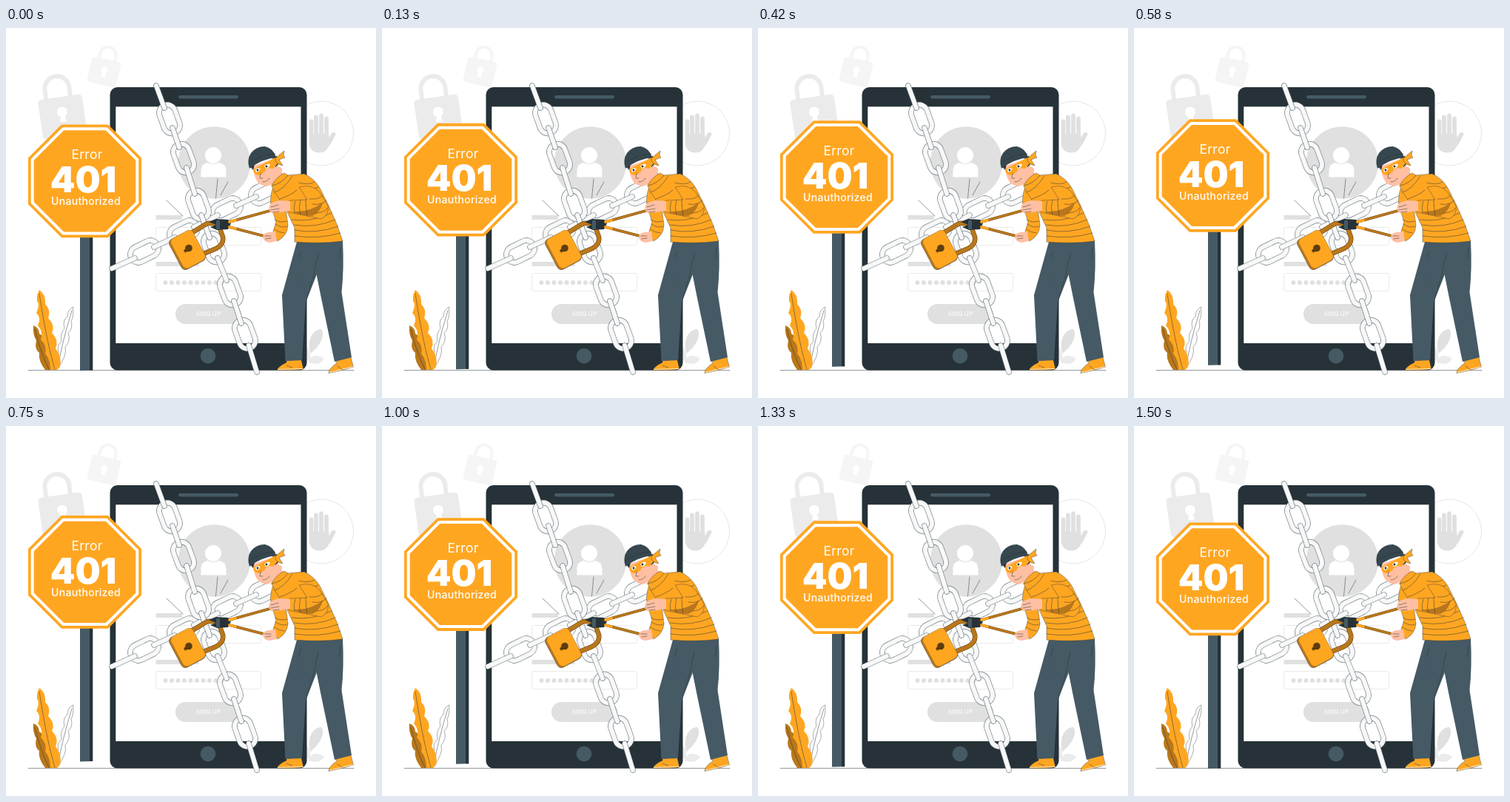
Write an HTML page that moves like this. It is 500 by 500 pixels and loops after 1.54 s.

```html
<!DOCTYPE html>
<html lang="en">
<head>
<meta charset="utf-8">
<title>Error 401</title>
<style>
  html, body { margin: 0; height: 100%; overflow: hidden; background: #fff; }
  svg { display: block; width: 100%; height: 100%; }
  text { font-family: Inter, "Open Sans", sans-serif; fill: #fff; text-anchor: middle; }
  .orange { fill: #ffa621; }
  .brown { fill: #b9771b; }
  .slate { fill: #455a64; }
  .dark { fill: #263238; }
  .skin { fill: #ffbfa3; }
  .grey { fill: #e0e0e0; }
  .line { fill: none; stroke: #263238; stroke-width: .5; stroke-linecap: round; }
  .ink { stroke: #263238; stroke-width: .4; stroke-linejoin: round; }
  .round { fill: none; stroke-linecap: round; stroke-linejoin: round; }
</style>
</head>
<body>
<svg viewBox="0 0 500 500">
  <!-- background padlocks -->
  <g transform="rotate(-8 76 118)" fill="#ebebeb">
    <path d="M57.500 95V81a16.500 16.500 0 0 1 33 0V95" fill="none" stroke="#ebebeb" stroke-width="6"/>
    <rect x="46" y="93" width="60" height="54" rx="5"/>
    <path d="M72 127l1.500-7a7 7 0 1 1 6 0l1.500 7z" fill="#fff"/>
  </g>
  <g transform="rotate(13 132.500 59.500)" fill="#f5f5f5">
    <path d="M121.500 48V36a11 11 0 0 1 22 0V48" fill="none" stroke="#f5f5f5" stroke-width="4"/>
    <rect x="112.500" y="42" width="40" height="35" rx="4"/>
    <path d="M129.500 66l1-5a4.500 4.500 0 1 1 4 0l1 5z" fill="#fff"/>
  </g>

  <!-- stop hand -->
  <circle cx="426" cy="142.500" r="43.500" fill="#fff" stroke="#e6e6e6"/>
  <g class="round" stroke="#e0e0e0" stroke-width="5.800" transform="translate(-1.500 .5)">
    <path d="M414 146V126M420.500 144V120M427.500 144V118M434.500 144V122M437 156L444 143"/>
    <path d="M411 142H437.500L439 155Q436 168 425 168Q412 168 411 154Z" fill="#e0e0e0" stroke="none"/>
  </g>

  <!-- grey plant -->
  <path class="grey" d="M411 440C407 422 413 408 426 407C432 415 424 431 411 440Z"/>
  <path d="M409 452C411 442 420 440 430 447C426 455 416 455 409 452ZM410 450C400 448 399 438 403 429C411 434 413 442 410 450Z" fill="#ebebeb"/>

  <path class="line" d="M30 462.500H470"/>

  <!-- tablet -->
  <rect class="dark" x="140.500" y="80" width="266" height="382.500" rx="10"/>
  <rect x="148.300" y="106.300" width="250.200" height="319.700" fill="#fff"/>
  <rect class="slate" x="233" y="91" width="81" height="4.500" rx="2.250"/>
  <circle class="slate" cx="273" cy="443" r="10.300"/>
  <g class="grey">
    <circle cx="281.500" cy="182" r="48.800"/>
    <rect x="202.500" y="253" width="35.500" height="6"/>
    <rect x="202.500" y="316" width="58" height="6"/>
    <rect x="229" y="373" width="89" height="27" rx="13.500"/>
    <g fill="none" stroke="#ebebeb">
      <rect x="202.500" y="269.500" width="142" height="24" rx="2"/>
      <rect x="202.500" y="331.500" width="142" height="24" rx="2"/>
    </g>
    <path class="round" d="M215.500 344H293" stroke="#e0e0e0" stroke-width="6" stroke-dasharray="0 8.500"/>
  </g>
  <g fill="#fff">
    <circle cx="280" cy="172" r="11"/>
    <path d="M263.500 201.500V192Q264 184 272 182Q280 186 288 182Q297 184 297.500 192V201.500Z"/>
  </g>
  <text x="273.500" y="389.300" font-size="8.200">SING UP</text>
  <path class="line" d="M217 233L239 254M286 204L283.500 230M300 208L290 226"/>

  <g id="chains"></g>

  <!-- padlock -->
  <g class="round">
    <path d="M249 278L272 264L284 264M267 305L284 298Q295 292 293 282L289 271" stroke="#5e3c0d" stroke-width="6.400"/>
    <path d="M249 278L272 264L284 264M267 305L284 298Q295 292 293 282L289 271" stroke="#b9771b" stroke-width="5.400"/>
  </g>
  <g transform="rotate(-28 245 300)">
    <rect class="brown ink" x="227" y="277" width="36" height="46" rx="6"/>
    <rect class="orange" x="230" y="277" width="33" height="45" rx="6"/>
  </g>
  <circle cx="247" cy="297.500" r="4.800" fill="#5e3c0d"/>
  <path d="M247 298L241 302" stroke="#5e3c0d" stroke-width="4"/>

  <!-- bolt cutter -->
  <path class="dark" d="M274 262L284 258L300 259L304 264L300 272L285 273L276 269L284 266Z"/>
  <rect class="slate" x="284" y="260" width="5" height="12" rx="1"/>
  <g class="round">
    <path d="M302 262L360 246M302 269L354 282.500" stroke="#5e3c0d" stroke-width="3.800"/>
    <path d="M302 262L360 246M302 269L354 282.500" stroke="#b9771b" stroke-width="3"/>
    <path d="M302 262L310 259.800M302 269L310 271" stroke="#ffa621" stroke-width="3.600"/>
  </g>

  <!-- far arm -->
  <path class="orange ink" d="M362 214Q356 225 358 240L365 262L361 275L367 288Q380 281 381 267L377 236Z"/>
  <path class="line" d="M363 259Q371 264 380 261M364 265Q373 271 380 268M363 272Q369 277 376 277"/>
  <path class="skin" d="M364 275L355 276Q348 277 347 282Q348 289 356 290L366 288Z"/>
  <path class="line" d="M350 281L358 281M351 285L358 284"/>

  <!-- legs and shoes -->
  <path class="orange ink" d="M379 449L399 448L402 461Q392 463 366 462.500Q368 457 379 452Z"/>
  <path class="orange ink" d="M446 449L466 445L469.500 458Q457 462 436 466.500Q436 460 447 453Z"/>
  <path d="M367 461.500L401 460.500M437 465.500L469 457.500" stroke="#fff" stroke-width=".8"/>
  <path class="line" d="M379 456L387 459M448 457L454 461"/>
  <path d="M393 289L373 361L377.500 450L400 449L405 371L427 315Z" fill="#455a64"/>
  <path class="slate" d="M393 289L455 287Q457 325 453.500 357L467 445L444 451L426 365L418 325L405 365Z"/>
  <path class="line" d="M418 323L422 305M418 326L405 371M399 301L396 310M452 296L451 312"/>

  <!-- head -->
  <path class="skin" d="M333 187L336 200Q339 212 352 214L361 211L364 222L379 203L369 190L365 176Z"/>
  <path class="dark" d="M329 186L334 192L336 184ZM360 175L364 188L368 184L366 173Z"/>
  <path class="orange" d="M334 191L364 175L367 183L361 190Q353 187 349 195Q341 202 337 197Q335 198 334 191Z"/>
  <path class="orange ink" d="M364 176L370 171L376 166L375 172L377 175L369 178L374 186Q367 185 364 180Z"/>
  <path d="M337 191.500Q340 188 343.500 190Q342 195 338 194.500ZM349 186.500Q352 183 357 184Q355 190 351 190Z" fill="#fff"/>
  <g class="dark"><circle cx="340" cy="192" r="1.400"/><circle cx="352" cy="187" r="1.500"/></g>
  <path class="line" d="M344 196L343 203L347 203M347 208Q353 208 356 203"/>
  <path class="skin" d="M364 190Q369 185 373 190Q374 197 367 199Z"/>
  <path d="M329 190Q325 178 331 169Q338 160 350 160Q362 163 365 175Q346 177 329 190Z" fill="#37474f"/>
  <path class="line" d="M328 183Q344 171 363 170"/>

  <!-- sweater -->
  <path class="orange ink" d="M359 213Q364 202 376 196L381 199L403 197Q416 203 424 216L436 240L447 265L455 288Q425 292 390 289L390 270L377 242L363 222Z"/>
  <path class="line" d="M359 213Q372 211 381 199M363 222Q376 218 387 200M370 231Q385 226 393 219M375 238Q384 238 393 234M386 259Q413 263 440 250M389 266Q418 271 445 259M390 273Q418 279 449 268M390 281Q421 286 452 277M396 209Q408 213 417 208M400 217Q414 220 422 215"/>
  <path class="orange ink" d="M396 215Q414 210 424 222L435 240Q437 253 426 258L382 249L383 233L407 232Z"/>
  <path class="brown" d="M386 248Q409 250 428 236Q425 249 414 254L400 253Z"/>
  <path class="line" d="M391 234Q388 242 390 250M398 233Q395 243 398 252M405 232Q405 244 407 254M410 231Q424 232 428 226M414 238Q426 240 433 233M419 250Q430 250 435 243"/>
  <path class="skin" d="M384 234L370 233Q358 235 356 240Q354 247 359 250L371 249L384 247Z"/>
  <path class="line" d="M358 242L368 239M358 246L369 244M361 249L369 248"/>

  <!-- left plant -->
  <path class="brown" d="M37 402Q45 405 45 413Q54 418 53 427Q61 435 64 462H53Q43 449 45 439Q38 434 41 422Q36 415 37 402Z"/>
  <path d="M90.500 377Q92 389 88 396Q91 406 84 412Q88 423 80 431Q83 442 70 460Q67 445 71 438Q68 430 75 423Q73 412 79 406Q76 395 83 390Q83 381 90.500 377Z" fill="#fff" class="ink"/>
  <path class="line" d="M89 382Q75 427 70 460"/>
  <path class="orange" d="M45 354Q54 360 53 373Q61 381 57 392Q67 402 62 412Q72 422 67 433Q76 444 73 458L69 462H60Q60 448 53 440Q56 430 47 421Q51 411 43 402Q48 392 41 385Q46 374 42 369Q41 361 45 354Z"/>
  <path class="line" d="M45 359Q55 425 66 461M39 407Q47 440 58 461"/>

  <!-- road sign -->
  <g id="sign">
    <path class="slate" d="M100 270H117V462.500L100 463Z"/>
    <path class="dark" d="M113 270H117.300V462.500H113Z"/>
    <path class="orange" d="M75 130.500H138L183 175.500V238.200L138 283.200H75L30 238.200V175.500Z"/>
    <path d="M77.300 136.300H135.700L177.300 177.800V235.900L135.700 277.400H77.300L35.700 235.900V177.800Z" fill="none" stroke="#fff" stroke-width="4"/>
    <text x="109.500" y="177.300" font-size="17.400" letter-spacing=".3">Error</text>
    <text x="104.500" y="222" font-size="48" font-weight="900">401</text>
    <text x="108" y="239" font-size="14" font-weight="500" letter-spacing=".3">Unauthorized</text>
  </g>
</svg>
<script>
  const chains = document.getElementById("chains");
  const sign = document.getElementById("sign");

  // Draws a shape as a pale tube with a thin dark outline.
  const tube = (shape) =>
    [["#455a64", 7.3], ["#e6e6e6", 6.5], ["#f8f8f8", 4.8]]
      .map(([color, width]) =>
        `<g class="round" stroke="${color}" stroke-width="${width}">${shape}</g>`)
      .join("");

  const ring = ([x, y], angle) => tube(
    `<rect x="${x - 20}" y="${y - 11}" width="40" height="22" rx="11"
      transform="rotate(${angle} ${x} ${y})"/>`);
  const bar = ([x1, y1, x2, y2]) => tube(`<path d="M${x1} ${y1}L${x2} ${y2}"/>`);

  const chain = (angle, rings, bars) =>
    rings.map((r) => ring(r, angle)).join("") + bars.map(bar).join("");

  chains.innerHTML =
    chain(-26,
      [[187, 302], [240, 275], [298, 245], [350, 222]],
      [[143, 325, 174, 311], [200, 296, 228, 283], [254, 269, 286, 253], [311, 240, 338, 228]]) +
    chain(70,
      [[221, 123], [240, 176], [260, 239], [281, 297], [303, 355], [323, 414]],
      [[203, 78, 214, 108], [225, 135, 234, 161], [244, 189, 255, 224], [264, 253, 275, 283],
       [286, 311, 298, 341], [308, 369, 318, 399], [328, 429, 339, 465]]);

  const LOOP = 1540, FLOAT = 1500, RISE = 9.5;

  function draw() {
    const t = Math.min(performance.now() % LOOP, FLOAT);
    const lift = RISE * (1 - Math.abs(1 - 2 * t / FLOAT));
    sign.setAttribute("transform", `translate(0 ${-lift})`);
    requestAnimationFrame(draw);
  }
  draw();
</script>
</body>
</html>
```
